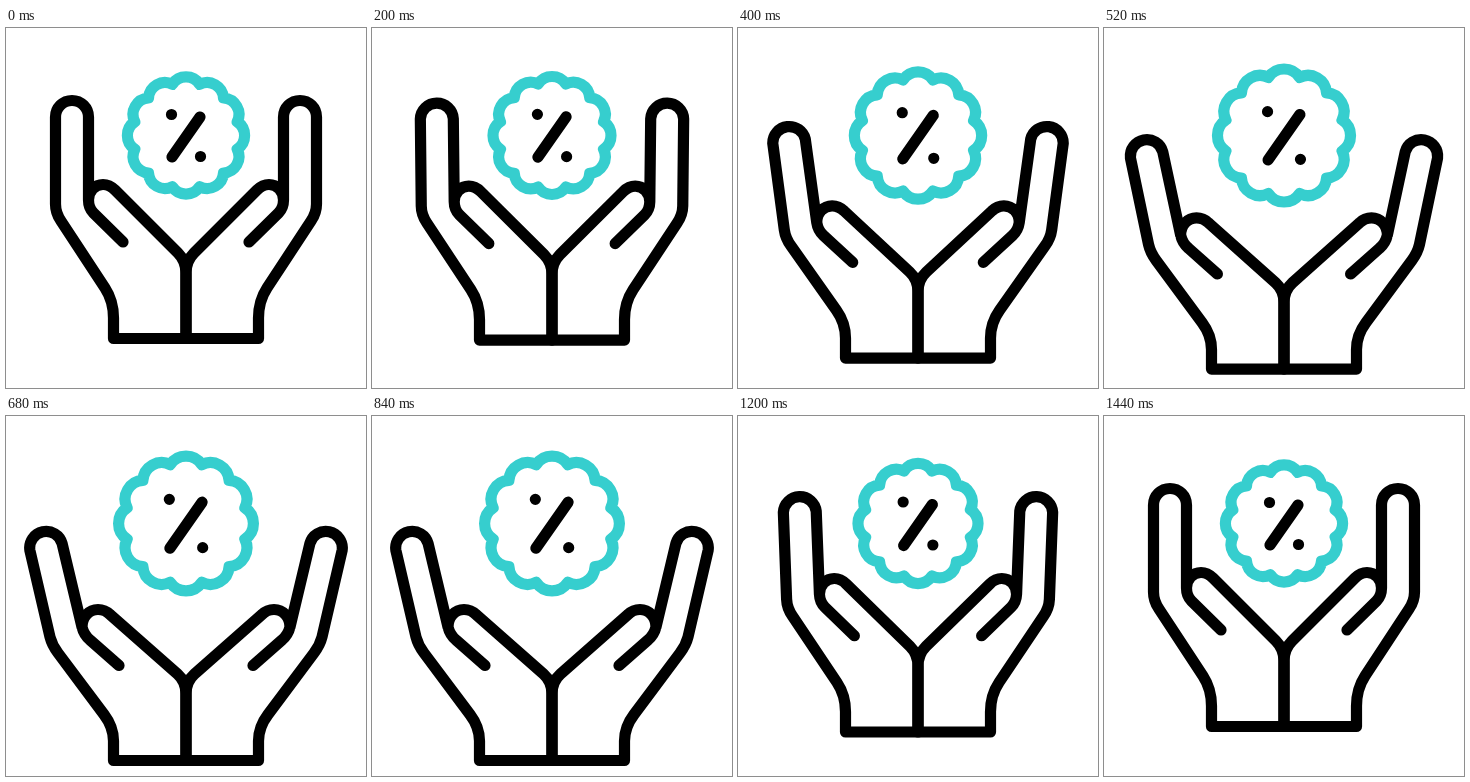
Animation, 360 px wide and 360 px high, one loop 1.52 s. Source, as an HTML page:

```html
<!DOCTYPE html>
<html lang="en">
<head>
<meta charset="utf-8">
<title>Discount in open hands</title>
<style>
html, body { margin: 0; width: 100%; height: 100%; overflow: hidden; background: #fff; }
svg { display: block; width: 100vw; height: 100vh; }
</style>
</head>
<body>
<svg viewBox="0 0 360 360" fill="none" stroke="#000" stroke-width="11.2" stroke-linecap="round" stroke-linejoin="round">
  <g id="badge">
    <path id="rim" stroke="#36cece"/>
    <path d="M-14 21.5 14-18.5M-14.5-21h.01M14.5 21h.01"/>
  </g>
  <path id="hand"/>
  <use href="#hand" transform="matrix(-1 0 0 1 360 0)"/>
</svg>
<script>
const LOOP = 1520, STEP = 40, EASE = 485;
const OPEN = 134, CLOSE = 843;
const LINE = 11.2;
const [badge, rim, hand] = ['badge', 'rim', 'hand'].map(id => document.getElementById(id));

// Twelve round lobes joined at the valleys
function scallop(lobes, radius, bump) {
  let d = '';
  for (let i = 0; i <= lobes; i++) {
    const a = (i + 0.5) * 2 * Math.PI / lobes - Math.PI / 2;
    const at = `${radius * Math.cos(a)} ${radius * Math.sin(a)}`;
    d += i ? `A${bump} ${bump} 0 0 1 ${at}` : `M${at}`;
  }
  return d + 'Z';
}

const ramp = x => (1 - Math.cos(Math.PI * Math.min(1, Math.max(0, x)))) / 2;
const spread = t => ramp((t - OPEN) / EASE) - ramp((t - CLOSE) / EASE);

// Left hand outline; every point slides from its closed to its open place
function handPath(p) {
  const pt = (x0, y0, x1, y1) => `${x0 + (x1 - x0) * p} ${y0 + (y1 - y0) * p} `;
  const base = pt(180, 310.5, 180, 344.5);
  const web = pt(82.5, 172, 76, 211);
  return 'M' + base +
    'L' + pt(107.5, 310.5, 107.5, 344.5) +
    'L' + pt(107.5, 290, 107.5, 325) +
    'Q' + pt(107.5, 273, 107.5, 311) + pt(99, 260, 98, 298.5) +
    'L' + pt(55, 193, 52, 237) +
    'Q' + pt(49.5, 185, 46, 229) + pt(49.5, 176, 44, 221) +
    'L' + pt(49.5, 89, 23.9, 134.5) +
    'A16.5 16.5 0 0 1 ' + pt(82.5, 89, 56.1, 127.5) +
    'L' + web +
    'Q' + pt(82.5, 180, 78, 219) + pt(87.5, 185, 84, 224) +
    'L' + pt(117, 214, 113, 249.5) +
    'M' + web +
    'C' + pt(82.5, 163, 76, 201) + pt(89, 156.5, 83, 193.5) + pt(97, 156.5, 92, 193.5) +
    'C' + pt(102, 156.5, 97, 193.5) + pt(106, 159, 101, 195.5) + pt(109, 162, 104, 198.5) +
    'L' + pt(172, 225, 171.5, 258) +
    'Q' + pt(180, 233, 180, 265.5) + pt(180, 245, 180, 278) +
    'L' + base;
}

function draw(t) {
  const p = spread(Math.floor(t / STEP) * STEP);
  const size = 1 + 0.15 * p;
  hand.setAttribute('d', handPath(p));
  badge.setAttribute('transform', `translate(180 107.5) scale(${size})`);
  badge.setAttribute('stroke-width', LINE / size);
}

rim.setAttribute('d', scallop(12, 53, 16.4));
draw(0);
const start = performance.now();
function tick() {
  draw((performance.now() - start) % LOOP);
  requestAnimationFrame(tick);
}
requestAnimationFrame(tick);
</script>
</body>
</html>
```
